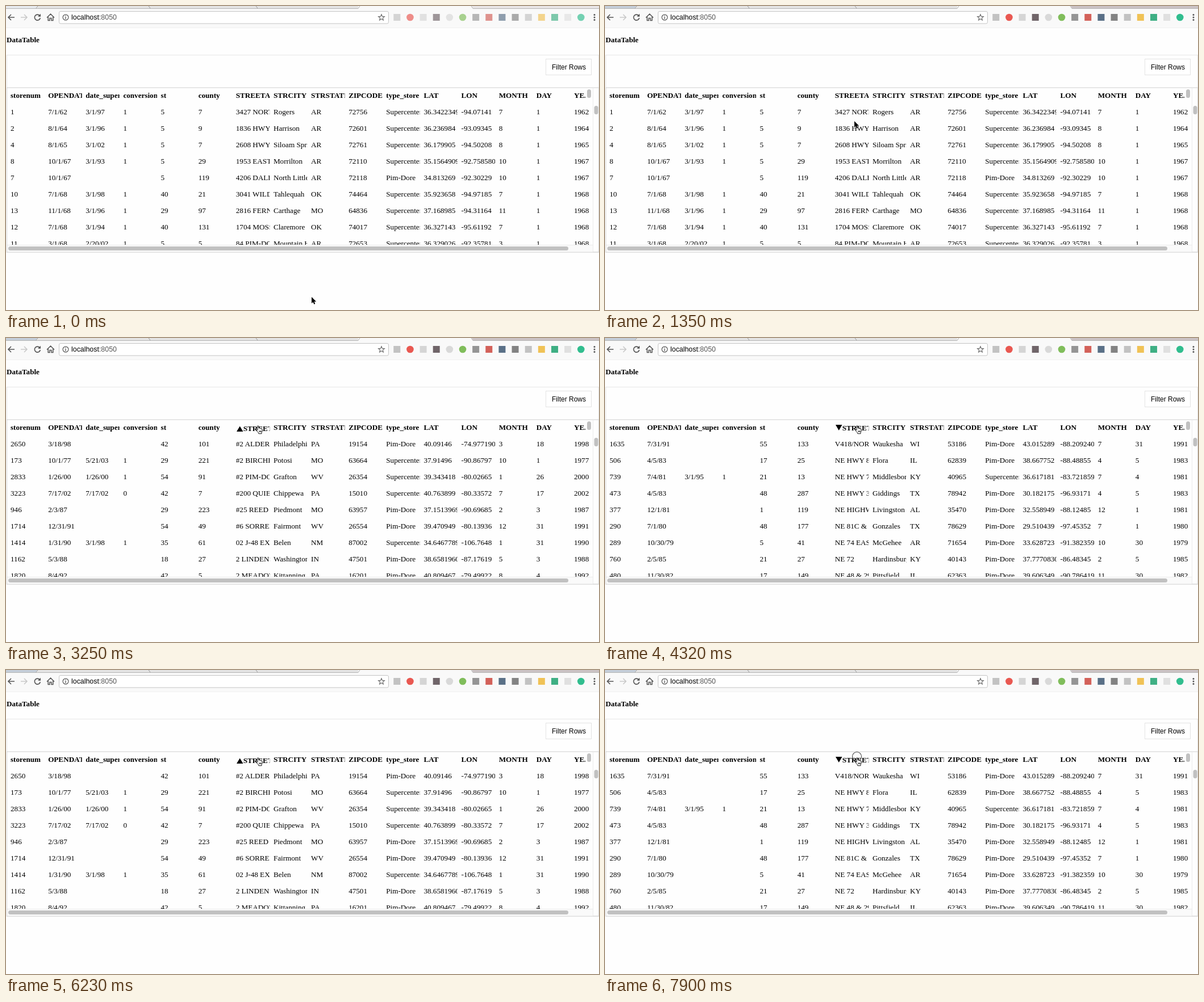
Animation, 1044 px wide and 536 px high, one loop 8 s. Source, as an HTML page:

```html
<!DOCTYPE html>
<html lang="en">
<head>
<meta charset="utf-8">
<title>DataTable</title>
<style>
html, body { margin: 0; width: 100%; height: 100%; overflow: hidden; background: #fefefe; }
svg { display: block; width: 1044px; height: 536px; }
text { white-space: pre; }
.serif { font: 13.15px "Liberation Serif", "Times New Roman", serif; }
.bold { font-weight: bold; }
.sans { font: 12px "Liberation Sans", Arial, sans-serif; }
</style>
</head>
<body>
<svg id="stage" viewBox="0 0 1044 536" xmlns="http://www.w3.org/2000/svg"></svg>
<script>
const NS = 'http://www.w3.org/2000/svg';
const stage = document.getElementById('stage');
const LOOP = 8000, COL = 66.13, ROW = 28.9;

function add(parent, tag, attrs, content) {
  const el = document.createElementNS(NS, tag);
  for (const k in attrs) el.setAttribute(k, attrs[k]);
  if (content !== undefined) el.textContent = content;
  parent.appendChild(el);
  return el;
}
const rect = (x, y, width, height, fill, more) => add(stage, 'rect', { x, y, width, height, fill, ...more });
const line = (d, stroke, width = 1, more) => add(stage, 'path', { d, stroke, fill: 'none', 'stroke-width': width, ...more });
const label = (parent, x, y, cls, str, fill = '#000') => add(parent, 'text', { x, y, class: cls, fill }, str);
const show = (el, on) => el.setAttribute('display', on ? 'inline' : 'none');
const colX = i => 8 + COL * i;

// Browser chrome; returns the parts that look dimmer while the window is inactive
function drawBrowser() {
  rect(0, 0, 1044, 38, '#f9f9f9');
  rect(55, 0, 565, 4, '#e4e4e4');
  const ends = add(stage, 'g', {});
  add(ends, 'path', { d: 'M0 0H55L53 4H0Z', fill: '#c5ced9' });
  add(ends, 'path', { d: 'M820 0H1044V4H822Z', fill: '#cbc3c5' });
  line('M0 4.5H620L623 0M819 0L822 4.5H1044', '#b4b4b4');
  line('M53 4L56 0M251 0L254 4M440 0L443 4', '#999');
  line('M0 38.5H1044', '#f1f1f1');

  line('M15 20H4M9 15L4 20L9 25', '#555', 1.6);
  line('M26 20H37M32 15L37 20L32 25', '#c9c9c9', 1.6);
  line('M59.3 17A5 5 0 1 0 60.3 21', '#555', 1.6);
  add(stage, 'path', { d: 'M61 13.8V18.8H56Z', fill: '#555' });
  line('M72 20.5L78.5 14L85 20.5M74.2 19V25.5H77V21.5H80V25.5H82.8V19', '#555', 1.5);

  rect(93.5, 9.5, 580, 21.5, '#fff', { rx: 2.5, stroke: '#c4c4c4' });
  add(stage, 'circle', { cx: 105, cy: 20, r: 4.9, fill: 'none', stroke: '#555', 'stroke-width': 1.2 });
  line('M105 19V23M105 16.8V18', '#555', 1.3);
  const url = label(stage, 115, 24, 'sans', 'localhost');
  url.style.fontSize = '12.4px';
  add(url, 'tspan', { fill: '#555' }, ':8050');
  let star = '';
  for (let i = 0; i < 10; i++) {
    const a = i * Math.PI / 5, r = i % 2 ? 2.5 : 5.7;
    star += (i ? 'L' : 'M') + (661 + r * Math.sin(a)).toFixed(2) + ' ' + (20.4 - r * Math.cos(a)).toFixed(2);
  }
  line(star + 'Z', '#666', 1.1);

  const marks = 's#bdbdbd c#e8473f s#d2d2d2 s#62565a c#d6d6d6 c#74b74a s#8b8b8b s#cf5148 s#49627b s#777 s#bdbdbd s#f0bd45 s#2ba878 s#dedede c#1cb783';
  const icons = add(stage, 'g', {});
  marks.split(' ').forEach((m, i) => {
    const cx = 688.3 + 23.14 * i, fill = m.slice(1);
    if (m[0] === 'c') add(icons, 'circle', { cx, cy: 20, r: 6.3, fill });
    else add(icons, 'rect', { x: cx - 6, y: 14, width: 12, height: 12, fill });
  });
  for (const cy of [15.5, 20, 24.5]) add(stage, 'circle', { cx: 1036, cy, r: 1.5, fill: '#555' });
  return { ends, icons };
}

// Page frame around the grid
function drawPanel() {
  label(stage, 1, 64, 'serif bold', 'DataTable');
  rect(1.5, 86.5, 1042, 347.5, 'none', { stroke: '#e6e6e6' });
  rect(950.5, 93.5, 80, 28, '#fff', { stroke: '#e3e3e3' });
  label(stage, 961, 111.5, 'sans', 'Filter Rows');
  line('M1 144H1044M1 434H1044', '#cfcfcf');
  line('M1.5 144V434M1043.5 144V434', '#d8d8d8');
}

function drawScrollbars() {
  rect(2, 421, 1031, 12.5, '#fafafa');
  line('M2 421.5H1033M1033.5 145V433', '#ebebeb');
  const thumb = { rx: 3.5 };
  rect(4, 424, 986, 7, '#c1c1c1', thumb);
  rect(1023, 147, 7, 15, '#c1c1c1', thumb);
  rect(1035.5, 176, 7, 15, '#c1c1c1', thumb);
}

const HEADS = 'storenum OPENDATE date_super conversion st county STREETADDR STRCITY STRSTATE ZIPCODE type_store LAT LON MONTH DAY YEAR'.split(' ');
const SORT_COL = 6;
const HEAD_Y = 162;
const TYPES = { S: 'Supercenter', P: 'Pim-Dore' };

// store|opened|super|conversion|st|county|street|city|state|zip|type|lat|lon
const TABLES = {
  plain: `1|7/1/62|3/1/97|1|5|7|3427 NORTH|Rogers|AR|72756|S|36.3422349|-94.07141
2|8/1/64|3/1/96|1|5|9|1836 HWY 9|Harrison|AR|72601|S|36.236984|-93.09345
4|8/1/65|3/1/02|1|5|7|2608 HWY 3|Siloam Springs|AR|72761|S|36.179905|-94.50208
8|10/1/67|3/1/93|1|5|29|1953 EAST|Morrilton|AR|72110|S|35.1564909|-92.758580
7|10/1/67|||5|119|4206 DALE|North Little Rock|AR|72118|P|34.813269|-92.30229
10|7/1/68|3/1/98|1|40|21|3041 WILD|Tahlequah|OK|74464|S|35.923658|-94.97185
13|11/1/68|3/1/96|1|29|97|2816 FERN|Carthage|MO|64836|S|37.168985|-94.31164
12|7/1/68|3/1/94|1|40|131|1704 MOSS|Claremore|OK|74017|S|36.327143|-95.61192
11|3/1/68|2/20/02|1|5|5|84 PIM-DORE|Mountain Home|AR|72653|S|36.329026|-92.35781`,
  asc: `2650|3/18/98|||42|101|#2 ALDERS|Philadelphia|PA|19154|P|40.09146|-74.977190
173|10/1/77|5/21/03|1|29|221|#2 BIRCHES|Potosi|MO|63664|S|37.91496|-90.86797
2833|1/26/00|1/26/00|1|54|91|#2 PIM-DORE|Grafton|WV|26354|S|39.343418|-80.02665
3223|7/17/02|7/17/02|0|42|7|#200 QUIET|Chippewa|PA|15010|S|40.763899|-80.33572
946|2/3/87|||29|223|#25 REED ST|Piedmont|MO|63957|P|37.1513969|-90.69685
1714|12/31/91|||54|49|#6 SORREL|Fairmont|WV|26554|P|39.470949|-80.13936
1414|1/31/90|3/1/98|1|35|61|02 J-48 EXIT|Belen|NM|87002|S|34.6467789|-106.7648
1162|5/3/88|||18|27|2 LINDENS|Washington|IN|47501|P|38.6581960|-87.17619
1820|8/4/92|||42|5|2 MEADOW|Kittanning|PA|16201|P|40.809467|-79.49922`,
  desc: `1635|7/31/91|||55|133|V418/NORTH|Waukesha|WI|53186|P|43.015289|-88.209240
506|4/5/83|||17|25|NE HWY 8|Flora|IL|62839|P|38.667752|-88.48855
739|7/4/81|3/1/95|1|21|13|NE HWY 7|Middlesboro|KY|40965|S|36.617181|-83.721859
473|4/5/83|||48|287|NE HWY 3|Giddings|TX|78942|P|30.182175|-96.93171
377|12/1/81|||1|119|NE HIGHWAY|Livingston|AL|35470|P|32.558949|-88.12485
290|7/1/80|||48|177|NE 81C &|Gonzales|TX|78629|P|29.510439|-97.45352
289|10/30/79|||5|41|NE 74 EAST|McGehee|AR|71654|P|33.628723|-91.382359
760|2/5/85|||21|27|NE 72|Hardinsburg|KY|40143|P|37.7770830|-86.48345
480|11/30/82|||17|149|NE 48 & 29|Pittsfield|IL|62363|P|39.606349|-90.786419`
};

function cells(row) {
  const c = row.split('|');
  const [month, day, yy] = c[1].split('/');
  c[10] = TYPES[c[10]];
  return c.concat(month, day, (yy < '10' ? '20' : '19') + yy);
}

function buildGrid() {
  const defs = add(stage, 'defs', {});
  const cols = HEADS.map((head, i) => {
    const clip = add(defs, 'clipPath', { id: 'col' + i });
    add(clip, 'rect', { x: colX(i) - 1, y: 145, width: i === 15 ? 28 : 60.5, height: 276 });
    const g = add(stage, 'g', { 'clip-path': `url(#col${i})` });
    if (i === 15) {
      const edge = add(defs, 'clipPath', { id: 'edge' });
      add(edge, 'rect', { x: 999, y: 145, width: 21, height: 25 });
      label(g, colX(i), HEAD_Y, 'serif bold', head).setAttribute('clip-path', 'url(#edge)');
    } else if (i !== SORT_COL) label(g, colX(i), HEAD_Y, 'serif bold', head);
    return g;
  });

  const rows = {};
  for (const name in TABLES) {
    const grid = TABLES[name].split('\n').map(cells);
    rows[name] = cols.map((col, i) => {
      const g = add(col, 'g', {});
      grid.forEach((r, n) => label(g, colX(i), Math.round(191.4 + ROW * n), 'serif', r[i]));
      return g;
    });
  }

  const sortHead = (x, y, arrow) => {
    const g = add(cols[SORT_COL], 'g', {});
    if (arrow) add(g, 'path', { d: arrow });
    label(g, x, y, 'serif bold', HEADS[SORT_COL]);
    return g;
  };
  const x = colX(SORT_COL);
  const heads = {
    plain: sortHead(x, HEAD_Y),
    asc: sortHead(x + 13, HEAD_Y + 2, 'M406 165H417.5L411.7 155.5Z'),
    desc: sortHead(x + 13, HEAD_Y + 1, 'M406 153H417.5L411.7 163Z')
  };
  return { rows, heads };
}

const { ends, icons } = drawBrowser();
drawPanel();
const { rows, heads } = buildGrid();
drawScrollbars();

const arrow = add(stage, 'path', {
  d: 'M0 0V11.3L2.6 8.9L4.4 12.9L6.3 12.1L4.6 8.2H8.2Z',
  stroke: '#fff', 'stroke-width': 1.4, 'paint-order': 'stroke'
});
const ring = add(stage, 'circle', { r: 8, fill: 'none', stroke: '#444', 'stroke-width': 1.1 });
const hand = add(stage, 'path', {
  d: 'M3.2 8.5L2.6 2Q2.7.7 3.7.7Q4.6.7 4.8 2L5.2 5Q6.5 4.3 7.2 5.4Q8.5 4.8 9.2 6Q10.7 5.6 11 7L11.2 9.5Q11 11.5 10 12.7V14.7H4.8L4.6 13.2Q2.5 11 .9 9Q.4 7.7 1.5 7.6Q2.4 7.7 3.2 8.5ZM6 9.5V12M7.6 9.5V12M9.2 9.5V12',
  fill: '#fff', stroke: '#111', 'stroke-width': 1
});

// Timelines: each entry holds until the next one
const POINTER = [
  [0, 538, 513], [110, 537, 513], [700, 536, 508], [820, 528, 483],
  [1000, 490, 375], [1110, 460, 273], [1350, 439, 203], [1470, 440, 176],
  [1650, 441, 160], [2010, 440, 155, 'hand'], [3020, 440, 154, 'hand']
];
const SORT = [[0, 'plain'], [3250, 'asc'], [4320, 'desc'], [6230, 'asc'], [7310, 'desc']];
const HEAD = [[0, 'plain'], [3250, 'asc'], [4320, 'desc'], [5040, 'plain'], [6230, 'asc'], [7310, 'desc']];
const CLICKS = [[560, 700], [3970, 4200], [4800, 5040], [5990, 6110], [7070, 7190], [7900, LOOP]];
const ACTIVE_FROM = 700;
const at = (track, t) => track.filter(k => k[0] <= t).pop();

function render(t) {
  const [, x, y, kind] = at(POINTER, t);
  const isHand = kind === 'hand';
  show(arrow, !isHand);
  show(hand, isHand);
  (isHand ? hand : arrow).setAttribute('transform', `translate(${x} ${y})`);

  show(ring, CLICKS.some(([from, to]) => t >= from && t < to));
  ring.setAttribute('cx', isHand ? 443.5 : 537.5);
  ring.setAttribute('cy', isHand ? 152.5 : 512.5);

  const active = t >= ACTIVE_FROM;
  ends.setAttribute('opacity', active ? 1 : 0.35);
  icons.setAttribute('opacity', active ? 0.9 : 0.6);

  const sort = at(SORT, t)[1], head = at(HEAD, t)[1];
  for (const name in rows) {
    rows[name].forEach(g => show(g, name === sort));
    show(heads[name], name === head);
  }
}

const start = performance.now();
function tick() {
  render((performance.now() - start) % LOOP);
  requestAnimationFrame(tick);
}
render(0);
requestAnimationFrame(tick);
</script>
</body>
</html>
```
